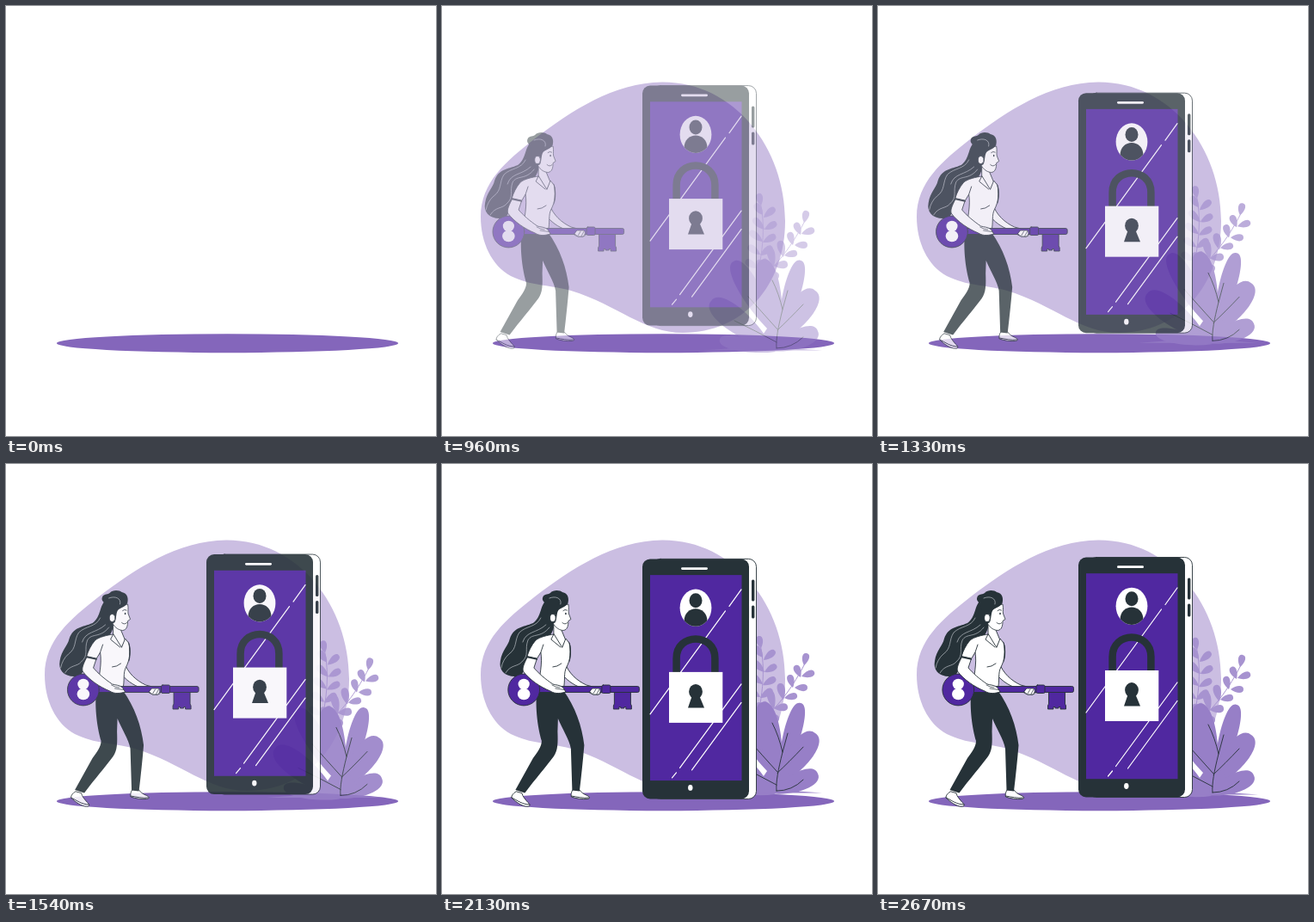
These frames come from a looping animation (500 px wide and 500 px high, 2.71 s). An HTML page with a canvas:

```html
<!DOCTYPE html>
<html lang="en">
<head>
<meta charset="utf-8">
<title>Unlocking a phone</title>
<style>
html, body { margin: 0; width: 100%; height: 100%; overflow: hidden; background: #fff; }
canvas { display: block; width: 500px; height: 500px; }
</style>
</head>
<body>
<canvas id="stage"></canvas>
<script>
const SIZE = 500, LOOP = 2710, LEAD = 40, SLIDE = 30;
const PURPLE = '#5028a0', DARK = '#263238', WHITE = '#fff';
const LEAF = '#977fc7', SPRIG = '#a793d0';

const ratio = window.devicePixelRatio || 1;
const stage = document.getElementById('stage');
const buffer = document.createElement('canvas');
for (const c of [stage, buffer]) c.width = c.height = SIZE * ratio;
const screen2d = stage.getContext('2d');
const g = buffer.getContext('2d');

function shape(d, fill, stroke, width = 0.9) {
  const path = new Path2D(d);
  if (fill) { g.fillStyle = fill; g.fill(path); }
  if (stroke) {
    g.strokeStyle = stroke;
    g.lineWidth = width;
    g.lineCap = g.lineJoin = 'round';
    g.stroke(path);
  }
}

const line = (d, color = DARK, width = 0.9) => shape(d, null, color, width);

function oval(x, y, rx, ry, fill, stroke) {
  g.beginPath();
  g.ellipse(x, y, rx, ry, 0, 0, Math.PI * 2);
  g.fillStyle = fill;
  g.fill();
  if (stroke) { g.strokeStyle = stroke; g.lineWidth = 0.9; g.stroke(); }
}

function box(x, y, w, h, r, fill, stroke) {
  g.beginPath();
  g.roundRect(x, y, w, h, r);
  g.fillStyle = fill;
  g.fill();
  if (stroke) { g.strokeStyle = stroke; g.lineWidth = 0.9; g.stroke(); }
}

// Leaf from its base to its tip, widest past the middle
function leaf(x0, y0, x1, y1, half, color) {
  const len = Math.hypot(x1 - x0, y1 - y0);
  g.save();
  g.translate(x0, y0);
  g.rotate(Math.atan2(y1 - y0, x1 - x0));
  const a = len * 0.45, b = len * 1.02, h = half * 1.35;
  shape(`M0 0C${a} ${-h} ${b} ${-h} ${len} 0C${b} ${h} ${a} ${h} 0 0Z`, color);
  g.restore();
}

function drawBlob() {
  shape('M45 245C45 205 75 180 107 155C150 122 200 89 256 88.5C340 88 399 165 399 250' +
    'C399 325 350 380 280 380C235 380 205 348 150 331C120 323 105 326 80 314C58 302 45 275 45 245Z', '#cbbee2');
}

function drawGround() {
  oval(257.5, 392.2, 198.5, 11, '#8466bb');
}

function drawPlant() {
  line('M362 316C372 280 378 240 369 208M366 306C384 289 402 273 423 232', SPRIG, 1);
  const sprigs = [
    [371, 216, 368, 202, 4], [373, 227, 364, 214, 4], [374, 230, 387, 219, 4],
    [375, 244, 362, 231, 4], [375, 244, 389, 236, 4], [373, 258, 358, 246, 4],
    [373, 259, 388, 251, 4], [370, 273, 356, 263, 4], [370, 274, 384, 264, 4],
    [367, 289, 353, 280, 4], [366, 290, 378, 279, 4], [364, 304, 351, 295, 4],
    [421, 236, 424, 222, 4], [417, 250, 411, 236, 4], [418, 249, 433, 244, 4],
    [408, 262, 404, 247, 4], [410, 262, 425, 262, 4], [397, 276, 393, 257, 4.5],
    [398, 274, 413, 271, 4], [386, 287, 381, 265, 4.5], [386, 286, 402, 284, 4.5],
    [373, 299, 368, 279, 4.5], [375, 297, 392, 298, 4.5]
  ];
  for (const s of sprigs) leaf(...s, SPRIG);
  const leaves = [
    [392, 372, 339, 281, 12], [386, 384, 313, 327, 14], [388, 386, 323, 372, 8],
    [393, 374, 373, 279, 13], [391, 376, 417, 280, 10], [386, 379, 434, 315, 14],
    [382, 385, 437, 362, 11]
  ];
  for (const l of leaves) leaf(...l, LEAF);
  shape('M303 384.5Q372 378 442 384.5Z', LEAF);
  shape('M362 384C372 368 380 354 390 345C400 356 410 372 416 384Z', LEAF);
  line('M389 382C388 372 391 357 396 337Q399 326 402 315M396 337Q392 319 384 303' +
    'M390 361Q403 349 420 331M390 360Q371 339 356 322M389 382Q407 382 420 369M389 375Q365 362 340 350');
}

function drawPhone() {
  box(245, 108.5, 120.5, 279, 9, WHITE, DARK);
  box(233, 108.5, 124, 279, 9, DARK);
  box(360, 132.5, 3.4, 25, 1.5, DARK);
  box(360, 162.5, 3.4, 15, 1.5, DARK);
  box(278, 118.3, 31, 2.8, 1.4, WHITE);
  oval(288.8, 374.5, 2.7, 3.4, WHITE);

  g.fillStyle = PURPLE;
  g.fillRect(242, 127.2, 106.5, 239);
  line('M348 144L334 163.5M329.5 169L242 289M348 254L276.5 351.5M272.5 357L267.5 363M348 275.5L290.5 354', WHITE, 1.2);

  g.save();
  oval(295, 165.3, 18.4, 21.6, WHITE);
  g.clip();
  shape('M281.5 188V181C281.5 161.5 308.5 161.5 308.5 181V188Z', DARK);
  oval(295, 165.3, 0, 0, DARK);
  oval(295, 156.8, 7.5, 8.5, DARK);
  g.restore();

  g.lineCap = 'butt';
  g.strokeStyle = DARK;
  g.lineWidth = 8.5;
  g.stroke(new Path2D('M272.6 241V224C272.6 194 317.4 194 317.4 224V241'));
  g.fillStyle = WHITE;
  g.fillRect(264, 240, 62.3, 59);
  oval(295, 262.8, 7.9, 8.7, DARK);
  shape('M291 267L286 281.5H305L299 267Z', DARK);
}

function drawKey() {
  shape('M198.5 263V279L197.5 281V285H204V282.5H206V284H210V282.5H212V285H218.5V281L217.5 279V263Z', PURPLE, DARK);
  box(108, 258.5, 119.5, 7, 2, PURPLE, DARK);
  box(184, 257, 10, 9.5, 1.5, PURPLE, DARK);
  oval(93.3, 262.5, 18.4, 18.4, PURPLE, DARK);
  oval(93.3, 256, 6.6, 6.3, WHITE);
  oval(93.3, 267.5, 7.3, 6.8, WHITE);
}

function drawLegs() {
  shape('M84 381C81 383 79 385 79 388C84 393 91 398 97 398.3C101 398.5 101 396 98 393.5C95 390 92 387 91 383Z', WHITE, DARK);
  line('M79 388C86 391 91 396 100 396');
  shape('M150 379C148 382 148 385 148.5 387C154 389 161 390 167 389.5C171 389 170 387 167 385.5C163 384 160 382 158 379Z', WHITE, DARK);
  line('M148.5 386C155 387 162 389 169 388');
  shape('M108.5 263C106 284 110 309 114 322C114 329 109 335 104 342L83.5 379L94.5 382.5' +
    'C106 367 120 351 128 340C133 333 133 324 132.5 311L133 296C138 308 146 320 148 331L149.5 379.5L158 380.5' +
    'C160 364 162 345 163.5 327C161 305 153 282 139 263Z', DARK);
}

function drawHair() {
  shape('M121 157C111 164 115 177 104 185C92 190 82 189 77 203C75 212 68 216 66 229' +
    'C64 239 70 247 83 247C94 247 94 238 97 228C100 216 112 212 114 204C126 203 128 192 130 181L138 165Z', DARK);
  const strand = '#b9bfc4';
  line('M113 179C108 190 96 188 88 196C82 205 86 214 76 221Q69 227 67 237', strand, 0.7);
  line('M123 190C113 203 103 196 98 205C94 216 100 222 91 230C86 236 78 233 72 243', strand, 0.7);
  line('M119 187C108 197 96 194 92 207', strand, 0.7);
}

function drawHead() {
  shape('M128 185V204L138 213L142 205L137 193Z', WHITE, DARK);
  shape('M130 166L145 163C146 168 145 171 145.5 174L148 180.5L145 182.5C145 188 144 193 139 193.5' +
    'C133 193 129 189 126 183Z', WHITE, DARK, 0.8);
  shape('M121 176C121 158 112 161 116 153.5C118 151 122 152 124 150C128 145.5 136 147 138 149' +
    'C145 150 146 157 144.5 162C141 167 136 167 133.5 170C131 174 132 180 130 184L124 188Z', DARK);
  oval(127, 179, 3.4, 4.5, WHITE, DARK);
  line('M123 156C130 153 138 156 136 163', '#b9bfc4', 0.7);
  line('M139 170.5Q141 168.5 143.5 170M138 184.5Q141 187.5 144 184.5', DARK, 0.8);
  oval(142, 174, 0.8, 1.3, DARK);
}

function drawTorso() {
  shape('M141 231C145 243 155 252 166 257L181 261C186 262 184 267 180 268L174 268C171 267 168 265 166 262C154 259 145 253 139 246Z', WHITE, DARK);
  line('M175 267L178 262M179 268L182 263', DARK, 0.7);
  shape('M128 198C121 199 112 201 107 205C102 211 99 217 97 224L108.5 226.5L113 219C115 232 112 245 109 264H139' +
    'C142 250 139 244 143 236C147 229 149 216 146 208L142 203L138 213Z', WHITE, DARK);
  line('M128 198L125 204L136 213M113 219L116 210M127 236Q132 236 137 232');
  shape('M145.5 206C149 211 149 225 146 231C147 222 147 214 145.5 206Z', DARK);
}

function drawNearArm() {
  shape('M97.5 224C95 230 91 236 92.5 241C100 251 112 259 124 264C130 268 137 266.5 142 265L139 260' +
    'C136 257 130 257 127 256C118 250 110 243 105 237L108.5 226.5Z', WHITE, DARK);
  line('M97 224.5L108.5 227', DARK, 1.3);
  line('M130 261L140 262.5M126 257Q131 260 135 260', DARK, 0.7);
}

function drawWoman() {
  drawLegs();
  drawHair();
  drawHead();
  drawTorso();
  drawKey();
  shape('M173 261L181 261Q184 264 180 268L174 268L170 265Z', WHITE, DARK, 0.7);
  line('M174 267L177 262M178 267.5L181 262', DARK, 0.7);
  drawNearArm();
}

function bezier(a, b, s) {
  const r = 1 - s;
  return 3 * r * r * s * a + 3 * r * s * s * b + s * s * s;
}

// cubic-bezier(.36, -.01, .5, 1.38): slow start, small overshoot
function ease(x) {
  if (x >= 1) return 1;
  let lo = 0, hi = 1;
  for (let i = 0; i < 24; i++) {
    const mid = (lo + hi) / 2;
    if (bezier(0.36, 0.5, mid) < x) lo = mid; else hi = mid;
  }
  return bezier(-0.01, 1.38, lo);
}

const clamp = v => Math.max(0, Math.min(1, v));

function layer(draw, alpha = 1, dx = 0, dy = 0) {
  g.setTransform(ratio, 0, 0, ratio, 0, 0);
  g.clearRect(0, 0, SIZE, SIZE);
  g.translate(dx, dy);
  draw();
  screen2d.globalAlpha = clamp(alpha);
  screen2d.drawImage(buffer, 0, 0);
}

function render(time) {
  const p = ease((time + LEAD) / LOOP);
  const away = SLIDE * (1 - p);
  screen2d.globalAlpha = 1;
  screen2d.fillStyle = WHITE;
  screen2d.fillRect(0, 0, stage.width, stage.height);
  layer(drawBlob, (time - 130) / 300);
  layer(drawGround);
  layer(drawPlant, p, 0, away);
  layer(drawPhone, p, 0, -away);
  layer(drawWoman, p, -away, 0);
}

const start = performance.now();
function tick() {
  render((performance.now() - start) % LOOP);
  requestAnimationFrame(tick);
}
tick();
</script>
</body>
</html>
```
